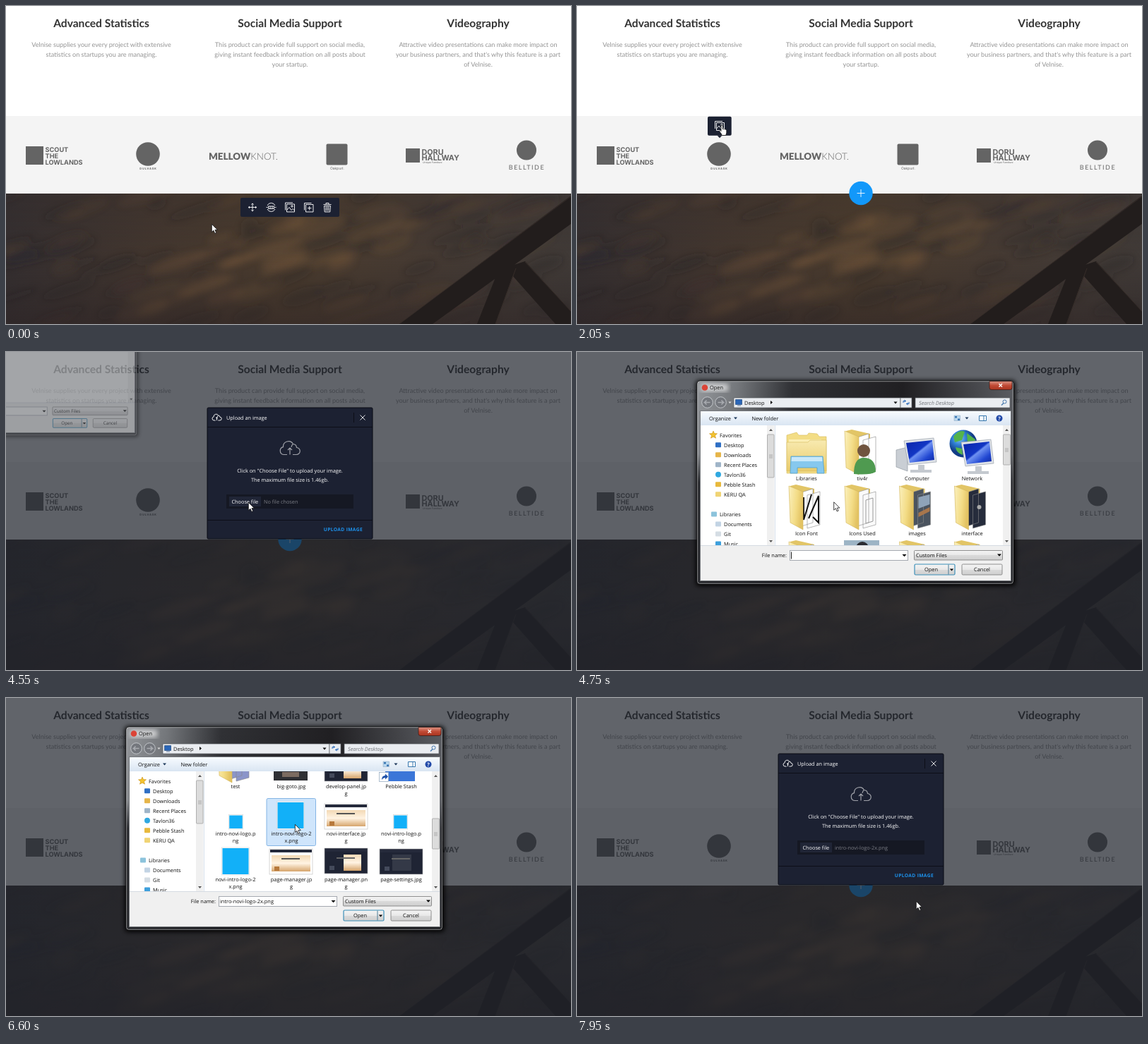
Recreate the animation shown at these times as an HTML page. Size 800x451 px, loop 8 s.

```html
<!DOCTYPE html>
<html lang="en">
<head>
<meta charset="utf-8">
<title>Image upload</title>
<style>
  html, body { margin: 0; width: 100%; height: 100%; overflow: hidden; background: #fff; }
  svg { display: block; width: 100vw; height: 100vh; text-rendering: geometricPrecision; }
  .mid { text-anchor: middle; }
  .end { text-anchor: end; }
  .head { font: 700 15.6px Lato, sans-serif; fill: #333; }
  .body { font: 9.1px Lato, sans-serif; fill: #939393; }
  .brand { fill: #646464; font-family: Inter, sans-serif; font-weight: 700; }
  .ui { font: 7.3px "Open Sans", sans-serif; fill: #fff; }
  .win { font: 7.4px "Open Sans", sans-serif; fill: #111; }
  .navy { fill: #1c2132; }
  .line { fill: none; stroke: #fff; stroke-width: .9; }
  .cloud { fill: none; stroke: #fff; }
</style>
</head>
<body>
<svg viewBox="0 0 800 451">
  <defs>
    <filter id="soft" x="-50%" y="-100%" width="200%" height="300%"><feGaussianBlur stdDeviation="5"/></filter>
    <filter id="shade" x="-10%" y="-10%" width="120%" height="120%"><feGaussianBlur stdDeviation="3"/></filter>
    <linearGradient id="sky"><stop stop-color="#352f30"/><stop offset=".25" stop-color="#42362f"/><stop offset=".5" stop-color="#4b3c2e"/><stop offset=".75" stop-color="#453a33"/><stop offset="1" stop-color="#403a37"/></linearGradient>
    <linearGradient id="dusk" x2="0" y2="1"><stop stop-color="#2a2526" stop-opacity=".15"/><stop offset=".5" stop-color="#2a2526" stop-opacity="0"/><stop offset="1" stop-color="#2a2123" stop-opacity=".5"/></linearGradient>
    <linearGradient id="glass"><stop stop-color="#95989c"/><stop offset=".13" stop-color="#74777b"/><stop offset=".3" stop-color="#303135"/><stop offset=".65" stop-color="#201f22"/><stop offset="1" stop-color="#5b5d62"/></linearGradient>
    <linearGradient id="glassFade" x2="0" y2="1"><stop stop-color="#15161a" stop-opacity="0"/><stop offset=".36" stop-color="#15161a" stop-opacity=".1"/><stop offset=".5" stop-color="#15161a" stop-opacity=".85"/></linearGradient>
    <linearGradient id="bar" x2="0" y2="1"><stop stop-color="#f7fbff"/><stop offset="1" stop-color="#d9e5f2"/></linearGradient>
    <linearGradient id="button" x2="0" y2="1"><stop stop-color="#f4f4f4"/><stop offset=".5" stop-color="#e8e8e8"/><stop offset=".51" stop-color="#dadada"/><stop offset="1" stop-color="#cfcfcf"/></linearGradient>
    <linearGradient id="red" x2="0" y2="1"><stop stop-color="#dc9484"/><stop offset=".5" stop-color="#c14a35"/><stop offset="1" stop-color="#a93520"/></linearGradient>
    <linearGradient id="screen" x2="1" y2="1"><stop stop-color="#0a24a8"/><stop offset=".45" stop-color="#1236c4"/><stop offset=".5" stop-color="#6f92f2"/><stop offset=".75" stop-color="#2248d2"/><stop offset="1" stop-color="#0b259b"/></linearGradient>
    <linearGradient id="flap" x2="1" y2=".3"><stop stop-color="#fbf0bd"/><stop offset=".6" stop-color="#f3dc86"/><stop offset="1" stop-color="#e3c363"/></linearGradient>
    <linearGradient id="front" x2="0" y2="1"><stop stop-color="#f8eab0"/><stop offset="1" stop-color="#e9cb6b"/></linearGradient>
    <radialGradient id="globe" cx=".35" cy=".3"><stop stop-color="#8cc8f5"/><stop offset=".5" stop-color="#2f7fd4"/><stop offset="1" stop-color="#123c86"/></radialGradient>
    <linearGradient id="sun" x2="0" y2="1"><stop stop-color="#f3d9b5"/><stop offset=".5" stop-color="#fff3e2"/><stop offset="1" stop-color="#d6a56c"/></linearGradient>
    <clipPath id="photoBox"><rect y="266" width="800" height="185"/></clipPath>
    <clipPath id="listBox"><rect x="281" y="104" width="321" height="170"/></clipPath>
    <clipPath id="sideBox"><rect x="175" y="104" width="105" height="170"/></clipPath>
    <g id="imageIcon" class="line"><path d="M-6.5 4V-6.5H4M-4.5-4.5H6.5V6.5H-4.5ZM-4.5 4-1 0 2 4 4 2 6.5 4.5"/><circle cx="3" cy="-1.5" r="1.2"/></g>
    <path id="cloud" class="cloud" d="M-4 9.500H-9A5.500 5.500 0 0 1-9.500-1.300A7.500 7.500 0 0 1 4.500-5.500A5.500 5.500 0 0 1 9.500-.5A5 5 0 0 1 9 9.500H4M2-1A6 6 0 0 1 4.500-5.500M0 9.500V0M-3 3 0 0 3 3"/>
  </defs>

  <g id="page">
    <rect width="800" height="451" fill="#fff"/>
    <rect y="156" width="800" height="110" fill="#f4f4f4"/>
    <g id="copy"></g>
    <g class="brand">
      <rect x="28" y="199" width="25" height="26"/>
      <g font-size="9.2"><text x="55.500" y="206.500">SCOUT</text><text x="55.500" y="215.700">THE</text><text x="55.500" y="225">LOWLANDS</text></g>
      <circle cx="201" cy="210" r="16.800"/>
      <text class="mid" x="201.500" y="232" font-size="4" letter-spacing=".8">DULVASK</text>
      <text x="287" y="217.500" font-size="13.400" font-family="Lato, sans-serif" font-weight="900">MELLOW<tspan font-weight="300">KNOT.</tspan></text>
      <rect x="453.500" y="195.500" width="30" height="30" rx="2"/>
      <text class="mid" x="469" y="232" font-size="5" font-weight="400">Oakpurl.</text>
      <rect x="566" y="202" width="20" height="20"/>
      <g font-size="10.800"><text x="588.500" y="210.500">DORU</text><text x="588.500" y="219.300">HALLWAY</text></g>
      <text x="590" y="222.800" font-size="3.500" font-weight="400">Unique Furniture</text>
      <circle cx="737" cy="204.500" r="14"/>
      <text class="mid" x="737.500" y="232" font-size="9" font-weight="400" letter-spacing="1.500" font-family="Lato, sans-serif">BELLTIDE</text>
    </g>
    <g clip-path="url(#photoBox)">
      <rect y="265" width="800" height="186" fill="url(#sky)"/>
      <g id="clouds" filter="url(#soft)"></g>
      <rect y="265" width="800" height="186" fill="url(#dusk)"/>
      <path fill="#221d1c" d="M800 269V309L604 451H557ZM697 375 722 370 693 451H667ZM707 371 735 362 800 433V451H778Z"/>
      <path fill="none" stroke="#352c28" d="M800 270 558 450M735 363 800 433M722 372 693 451"/>
    </g>
    <g id="plus"><circle cx="402" cy="265.500" r="16.700" fill="#1298fa"/><path class="line" d="M396.500 265.500h11M402 260v11"/></g>
    <g id="toolbar">
      <rect class="navy" x="332" y="272" width="140" height="27" rx="2"/>
      <g class="line">
        <path d="M343.500 285.500h11M349 280v11M345 284l-1.700 1.500 1.700 1.500M353 284l1.700 1.500-1.700 1.500M347.500 281.600l1.500-1.700 1.500 1.700M347.500 289.400l1.500 1.700 1.500-1.700"/>
        <path d="M370 283a6 6 0 0 1 11 0M370 288a6 6 0 0 0 11 0M368.500 285.500h2M380.500 285.500h2M371.500 284h8v3.500h-8ZM374 284v3M377 284v3"/>
        <path d="M422.500 289.500V279.500H432.500M424.500 281.500h10.500v10.500h-10.500ZM427 286.700h5.500M429.700 284v5.500"/>
        <path d="M449.500 281.500h11M453 281.500v-2h4v2M450.500 283.500h9l-.700 8.500h-7.600ZM453 284.500v6M455 284.500v6M457 284.500v6"/>
      </g>
      <use href="#imageIcon" x="402" y="285.500"/>
    </g>
    <g id="popover"><rect class="navy" x="185" y="156.700" width="33.700" height="27" rx="2"/><path class="navy" d="M198.500 183.500h7l-3.500 3.700Z"/><use href="#imageIcon" x="202" y="170"/></g>
    <g id="tooltip"><rect class="navy" x="168" y="127" width="68" height="23" rx="2"/><path class="navy" d="M199 150h6l-3 3Z"/><text class="ui mid" x="202" y="141">Change image</text></g>
  </g>

  <g id="modal">
    <rect width="800" height="451" fill="#1f232b" opacity=".7"/>
    <rect class="navy" x="285" y="79" width="234" height="186" rx="1.500" stroke="#090b12"/>
    <path stroke="#0c0e17" fill="none" d="M285 106.500H519M285 238.500H519M492.500 86V100"/>
    <use href="#cloud" transform="translate(298.500 92.500) scale(.47)" stroke-width="2"/>
    <text class="ui" x="312" y="95.500">Upload an image</text>
    <path class="line" d="M501.500 89.500l7 7M508.500 89.500l-7 7"/>
    <use href="#cloud" transform="translate(402 136)" stroke-width="1.200" opacity=".58"/>
    <text class="ui mid" x="402" y="170.800">Click on "Choose File" to upload your image.</text>
    <text class="ui mid" x="402" y="184">The maximum file size is 1.46gb.</text>
    <rect x="312" y="202" width="180" height="20" fill="#151823"/>
    <rect x="316" y="205" width="45" height="14" fill="#202536"/>
    <text class="ui mid" x="338.300" y="215">Choose file</text>
    <text class="ui" id="chosen" x="365" y="215" style="fill:#7b7d85"></text>
    <text class="ui end" x="505" y="254.300" style="fill:#1d93ee;font-size:6.700px;font-weight:700" letter-spacing=".35">UPLOAD IMAGE</text>
  </g>

  <g id="dialog">
    <rect id="glow" x="168" y="40" width="453" height="292" rx="5" fill="#000" filter="url(#shade)"/>
    <rect x="170" y="41" width="448" height="288" rx="4" fill="url(#glass)"/>
    <rect x="170" y="41" width="448" height="288" rx="4" fill="url(#glassFade)" stroke="#0d0e10"/>
    <rect x="170.700" y="41.700" width="446.600" height="286.600" rx="3" fill="none" stroke="#fff" stroke-opacity=".6" stroke-width=".8"/>
    <rect x="176" y="45" width="38" height="11" fill="#fff" opacity=".6" filter="url(#shade)"/>
    <circle cx="181" cy="50.500" r="4.300" fill="#db4437"/>
    <text class="win" x="188" y="53.300">Open</text>
    <path d="M584 41.500h32v9q0 3-3 3h-26q-3 0-3-3Z" fill="url(#red)" stroke="#3b1510" stroke-width=".7"/>
    <path d="M597.500 45l4.500 4.500M602 45l-4.500 4.500" stroke="#fff" stroke-width="1.400"/>
    <g fill="#74777d" stroke="#d5d8dc" stroke-width=".8"><circle cx="184.500" cy="71.500" r="7.800"/><circle cx="203.500" cy="71.500" r="7.800"/></g>
    <path d="M188.500 71.500h-8l3-3M180.500 71.500l3 3M199.500 71.500h8l-3-3M207.500 71.500l-3 3" fill="none" stroke="#a9acb1" stroke-width="1.500"/>
    <path d="M214.500 70.500h4l-2 2.500Z" fill="#ddd"/>
    <g fill="#eaedf1" stroke="#5c6065" stroke-width=".7"><rect x="222" y="65" width="236" height="14"/><rect x="458" y="65" width="16" height="14"/><rect x="479" y="65" width="134" height="14"/></g>
    <path d="M224.500 67.500h9v7h-9ZM227 76h5" fill="#2a66b8" stroke="#234a7c" stroke-width=".7"/>
    <text class="win" x="237" y="74.500">Desktop</text>
    <path d="M274 69l3 2.500-3 2.500ZM448.500 70.500h5l-2.500 3Z"/>
    <path d="M462 72v-2.500h3.500M463.500 68l2 1.500-2 1.500M470 71v2.500h-3.500M468.500 75l-2-1.500 2-1.500" fill="none" stroke="#2465b8"/>
    <text class="win" x="484" y="74.500" style="fill:#73767b;font-style:italic">Search Desktop</text>
    <path d="M601 75.500l3-3" stroke="#4778ae" stroke-width="1.500"/><circle cx="605.500" cy="70.500" r="2.500" fill="none" stroke="#4778ae"/>
    <rect x="174.500" y="83.500" width="440" height="241" fill="#f0f0f0" stroke="#777a7e"/>
    <rect x="175" y="84" width="439" height="20" fill="url(#bar)"/>
    <g style="fill:#1e395b"><text class="win" x="187" y="96.700">Organize</text><path d="M222 92.500h5l-2.500 3ZM549.500 92.500h5l-2.500 3Z"/><text class="win" x="247.500" y="96.700">New folder</text></g>
    <path d="M534 90h8.500v7.500h-8.500Z" fill="#b9d7ee" stroke="#8ba3bc" stroke-width=".5"/><path d="M535 91h3v2.500h-3ZM539 94.500h3v2.500h-3Z" fill="#3d78b4"/>
    <path d="M569.500 90.500h10v7h-10ZM576 90.500v7" fill="#fff" stroke="#3576ad"/>
    <circle cx="598" cy="94" r="4.500" fill="#2149a8"/><text class="win mid" x="598" y="96.800" style="fill:#fff;font-weight:700">?</text>
    <rect x="175" y="104" width="439" height="170" fill="#fff"/>
    <g id="sidebar" clip-path="url(#sideBox)"></g>
    <path d="M280.500 104V274" stroke="#d9e3ee"/>
    <g id="list" clip-path="url(#listBox)"><g id="files"></g></g>
    <g fill="#f0f0f0"><rect x="269" y="104" width="10.500" height="170"/><rect x="603" y="104" width="11" height="170"/></g>
    <path fill="#555" d="M272 112h5l-2.500-3ZM272 267h5l-2.500 3ZM606 112h5l-2.500-3ZM606 267h5l-2.500 3Z"/>
    <g fill="#dcdcdc" stroke="#999" stroke-width=".7"><rect x="269.500" y="117" width="9.500" height="61" rx="1"/><path d="M272 146h5M272 148h5M272 150h5"/><g id="thumb"><rect x="603.500" y="117" width="10" height="43" rx="1"/><path d="M606 137h5M606 139h5M606 141h5"/></g></g>
    <path d="M175 274.500H614" stroke="#d5dbe2"/>
    <text class="win end" x="297" y="290.500">File name:</text>
    <rect x="301.500" y="281.500" width="167" height="14" fill="#fff" stroke="#a5a9b0"/>
    <text class="win" id="fileName" x="303" y="290.800"></text>
    <path id="caret" d="M303.500 283.500v10" stroke="#000" stroke-width=".9"/>
    <g stroke="#777" fill="url(#button)" stroke-width=".8"><rect x="477.500" y="281.500" width="125" height="13.500" rx="1"/><rect x="545" y="301" width="57" height="15" rx="1.500"/><rect id="openButton" x="478" y="301" width="57" height="15" rx="1.500" style="stroke:#3c8fb8;stroke-width:1.200"/></g>
    <path d="M526 301.500v14" stroke="#4b7d97"/><path d="M460.500 287h6l-3 3.300ZM595 286.500h6l-3 3.300ZM527.700 307.500h5.500l-2.700 3Z"/>
    <text class="win" x="480" y="290.800">Custom Files</text>
    <text class="win mid" x="501.500" y="311.200">Open</text><text class="win mid" x="573.500" y="311.200">Cancel</text>
  </g>

  <g id="cursor">
    <path id="arrow" fill="#fff" stroke="#111" stroke-width=".8" d="M.3.300V11.700L2.900 9.300 4.800 13.500 6.700 12.600 4.900 8.600H8.400Z"/>
    <path id="hand" fill="#fff" stroke="#111" stroke-width=".8" d="M1 2.200Q1 .8 2.200.800T3.400 2.200V6.500Q4.500 5.700 5.400 6.800 6.600 6 7.300 7.300 8.700 6.800 8.800 8.500V11.500Q8.500 13 7.700 15.500H2.300Q1.500 13-.8 10.500-1.700 9-.6 8.500.200 8.300 1 9.500Z"/>
  </g>
</svg>
<script>
const $ = id => document.getElementById(id);
const text = (x, y, cls, str) => `<text class="${cls}" x="${x}" y="${y}">${str}</text>`;
const rect = (x, y, w, h, fill, extra = '') => `<rect x="${x}" y="${y}" width="${w}" height="${h}" fill="${fill}" ${extra}/>`;

// Page copy
$('copy').innerHTML = [
  [135, 'Advanced Statistics', 'Velnise supplies your every project with extensive', 'statistics on startups you are managing.'],
  [402, 'Social Media Support', 'This product can provide full support on social media,', 'giving instant feedback information on all posts about', 'your startup.'],
  [668.5, 'Videography', 'Attractive video presentations can make more impact on', "your business partners, and that's why this feature is a part", 'of Velnise.'],
].map(([x, title, ...lines]) => text(x, 30, 'head mid', title) +
  lines.map((line, i) => text(x, 58 + 14 * i, 'body mid', line)).join('')).join('');

// Sunset clouds: warm near the middle, dark towards the edges
let seed = 11;
const random = () => (seed = seed * 16807 % 2147483647) / 2147483647;
$('clouds').innerHTML = Array.from({ length: 110 }, () => {
  const x = random() * 800, y = 265 + random() * 186;
  const warmth = Math.exp(-(((x - 360) / 260) ** 2) - ((y - 355) / 95) ** 2);
  const warm = random() < .3 + warmth * .3;
  return `<ellipse cx="${x}" cy="${y}" rx="${12 + random() * 34}" ry="${4 + random() * 8}" transform="rotate(-18 ${x} ${y})"
    fill="${warm ? '#80603f' : '#29242a'}" opacity="${warm ? .06 + warmth * .24 : .24}"/>`;
}).join('');

// Sidebar of the file dialog
const sideItem = (x, y, label, color, round) =>
  (round ? `<circle cx="${x - 8}" cy="${y - 3}" r="4" fill="${color}"/>` : rect(x - 12, y - 6.5, 8, 7, color, 'rx="1"')) + text(x, y, 'win', label);
$('sidebar').innerHTML =
  '<path fill="#f2c22e" stroke="#c98f17" stroke-width=".6" d="M193 112l1.500 3.500 4 .3-3 2.600 1 3.800-3.500-2-3.500 2 1-3.800-3-2.600 4-.3Z"/>' +
  text(202, 120.5, 'win', 'Favorites') +
  [['Desktop', '#2f6fc4'], ['Downloads', '#e6b54a'], ['Recent Places', '#9fb4c8'], ['Tavlon36', '#2fa8e0', 1], ['Pebble Stash', '#e8b93c'], ['KERU QA', '#f0d475']]
    .map(([label, color, round], i) => sideItem(208, 134.8 + 14 * i, label, color, round)).join('') +
  sideItem(202, 233, 'Libraries', '#8cc3dc') +
  [['Documents', '#c3d4e4'], ['Git', '#d5dde4'], ['Music', '#3d9fdc']]
    .map(([label, color], i) => sideItem(208, 247 + 14 * i, label, color)).join('');

// Contents of the file list
const columns = [325, 404, 481.5, 559.5];
const folder = (x, y, inside = '#fff', extra = '') => `<g transform="translate(${x - 25} ${y})">
  <path fill="#e2c566" d="M2 2 10 0 36 6V58L2 49Z"/>
  <path fill="${inside}" stroke="#888" stroke-width=".6" d="M18 11 34 6V54L18 59ZM26 15 44 10V57L26 62Z"/>${extra}
  <path fill="url(#flap)" stroke="#d2b458" stroke-width=".6" d="M0 2 20 10V64L2 54Z"/></g>`;
const monitor = (x, y) => `<path fill="#dfe3e8" stroke="#9ba3ab" stroke-width=".7" d="M${x} ${y + 2}l42-4 4 34-40 4Z"/>
  <path fill="url(#screen)" d="M${x + 3} ${y + 5}l37-4 3 28-35 4Z"/><path fill="#c4c9cf" d="M${x + 20} ${y + 36}h9v7h10v4h-30v-4h11Z"/>`;
const labels = (names, y) => names.map((name, i) => name.split('|')
  .map((line, row) => text(columns[i], y + 10 * row, 'win mid', line)).join('')).join('');
const page = (x, y, dark, warm = true) => rect(x, y, 61, 36, dark ? '#1f2434' : '#fff', 'stroke="#bbb" stroke-width=".6"') +
  rect(x + 1, y + 1, 59, 4, '#252a3b') + (warm ? rect(x + (dark ? 27 : 3), y + 9, dark ? 25 : 55, 23, 'url(#sun)') : rect(x + 18, y + 8, 27, 23, '#343947')) +
  rect(x + 17, y + 13, 26, 2, dark ? '#666' : '#555') + rect(x + 7, y + 25, 7, 6, dark ? '#444a5b' : '#b7793c');
const tile = (cx, bottom, size) => rect(cx - size / 2 - 1, bottom - size - 1, size + 2, size + 2, '#fff', 'stroke="#ccc" stroke-width=".5"') +
  rect(cx - size / 2, bottom - size, size, size, '#12b0f8');
const scrollRange = 279;

$('files').innerHTML =
  '<rect id="hover" x="369" y="187.500" width="69.500" height="77" rx="2" fill="#f2f8fe" stroke="#c3ddf5"/>' +
  // first rows
  `<path fill="#f3dd85" stroke="#d6ba5c" stroke-width=".6" d="M297 118l14-4 3 4h12l2-3 12 1 3 4h10v52h-56Z"/>
   <path fill="#fbeeb4" d="M300 124h46v20h-46Z"/><path fill="url(#front)" stroke="#d6ba5c" stroke-width=".6" d="M297 128h30l3-3h23v44h-56Z"/>
   <path fill="#86c8ee" stroke="#4a9fd0" stroke-width=".8" d="M303 148h45l2 24h-10v-8h-28v8h-10Z"/><path fill="#c9e8fa" d="M304 149h43l.5 6h-44Z"/>` +
  folder(404, 110) +
  `<circle cx="406" cy="140" r="9" fill="#70543f"/><path fill="#4f9a50" d="M392 173q0-23 14-23 17 0 17 20-8 5-31 3Z"/>` +
  `<path fill="#c9ced4" stroke="#949ca4" stroke-width=".7" d="M452 139l16-4v34l-16-6Z"/>` + monitor(463, 124) +
  `<circle cx="547" cy="130" r="19.500" fill="url(#globe)"/><path fill="#55b34b" d="M533 120q8-11 16-7l-4 12-10 3ZM552 115l12 9-3 11-8-6ZM536 135l9 2 1 9q-9-3-10-11Z"/>` + monitor(544, 126) +
  folder(325, 188, '#fff', '<path fill="none" stroke="#111" stroke-width="2" d="M21 18V50L32 14M28 48 42 16V54L34 46"/>') +
  folder(404, 188, '#fafafa', '<path fill="none" stroke="#999" d="M30 22 40 19V52L30 55Z"/>') +
  folder(481.5, 188, '#4b545f', '<path fill="#8fa3b8" d="M27 18 43 14V28L27 34Z"/><path fill="#a8764c" d="M27 40 43 32V38L27 46Z"/>') +
  folder(559.5, 188, '#262c3c', '<circle cx="35" cy="32" r="3" fill="#aaa"/>') +
  folder(325, 267) + rect(378, 267, 50, 55, '#9db4c5') + '<circle cx="404" cy="278" r="9" fill="#2b2c32"/>' + folder(481.5, 267) + folder(559.5, 267) +
  labels(['Libraries', 'tiv4r', 'Computer', 'Network'], 182.3) +
  labels(['Icon Font', 'Icons Used', 'images', 'interface'], 260.3) +
  // last rows, laid out as seen when scrolled to the end
  `<g transform="translate(0 ${scrollRange})">
   <rect id="selection" x="369" y="142.500" width="69.500" height="67" rx="2" fill="#cfe5fb" stroke="#84b4e4"/>` +
  folder(325, 56, '#8b95c9') + rect(379, 82, 48, 35, '#2f3034') + rect(391, 105, 24, 7, '#7b6b60') + page(451, 82, true) +
  rect(537, 76, 42, 42, '#3b76d8') + rect(528.5, 105.5, 13, 13, '#fff', 'stroke="#8da4bd" stroke-width=".7"') +
  `<path d="M532 116q0-6 5-6v-2.500l4 4-4 4v-2.500q-3 0-5 3Z" fill="#1d50a8"/>` +
  tile(325.5, 185, 18.5) + tile(403, 185, 37) + page(451, 150, false) + tile(558.5, 185, 18.5) +
  tile(325, 250, 37) + page(373, 214, false) + page(451, 213, true) + page(529, 214, true, false) +
  labels(['test', 'big-goto.jpg', 'develop-panel.jp|g', 'Pebble Stash'], 127.7) +
  labels(['intro-novi-logo.p|ng', 'intro-novi-logo-2|x.png', 'novi-interface.jp|g', 'novi-intro-logo.p|ng'], 195) +
  labels(['novi-intro-logo-2|x.png', 'page-manager.jp|g', 'page-manager.pn|g', 'page-settings.jpg'], 259.5) + '</g>';

// Timeline
const duration = 8000, file = 'intro-novi-logo-2x.png';
const cursorPath = [
  [0, 291, 309], [333, 291, 309], [1200, 203, 214], [2050, 203, 168], [3333, 203, 168], [4200, 343, 213], [4583, 343, 213],
  [5250, 424, 211], [6200, 424, 211], [6550, 409, 179], [6650, 409, 179], [7050, 494, 303], [7100, 494, 303], [7600, 480, 288], [duration, 480, 288],
];
const wheelTurns = [5500, 5567, 5633, 5700, 5783, 5950, 6050];
const ramp = (t, from, to) => Math.min(1, Math.max(0, (t - from) / (to - from)));
const fade = (id, opacity) => {
  $(id).style.opacity = opacity;
  $(id).style.display = opacity > 0 ? '' : 'none';
};

function cursorAt(t) {
  const i = cursorPath.findIndex(key => key[0] > t);
  const [t0, x0, y0] = cursorPath[i - 1], [t1, x1, y1] = cursorPath[i];
  const p = ramp(t, t0, t1);
  return [x0 + (x1 - x0) * p, y0 + (y1 - y0) * p];
}

function placeDialog(t) {
  const opening = ramp(t, 4450, 4690), closing = ramp(t, 7700, 7950);
  const scale = opening < 1 ? .74 + .26 * opening : 1 - .06 * closing;
  const [x, y] = opening < 1 ? [-5, -4] : [394, 185];
  $('dialog').setAttribute('transform', `translate(${x} ${y}) scale(${scale}) translate(-394 -185)`);
  fade('dialog', opening * (1 - closing));
  fade('list', opening < 1 ? 0 : 1);
}

function draw(t) {
  const leaving = ramp(t, 733, 870), modal = ramp(t, 3100, 3200);
  fade('toolbar', 1 - leaving);
  fade('plus', leaving);
  fade('popover', ramp(t, 1230, 1420) * (1 - modal));
  fade('tooltip', ramp(t, 2370, 2650) * (1 - modal));
  fade('modal', modal);
  placeDialog(t);

  const turned = wheelTurns.filter(time => time <= t).length / wheelTurns.length;
  $('files').setAttribute('transform', `translate(0 ${-scrollRange * turned})`);
  $('thumb').setAttribute('transform', `translate(0 ${54 * turned})`);
  const picked = t >= 6560;
  fade('hover', t > 5200 && !turned ? 1 : 0);
  fade('selection', picked ? 1 : 0);
  fade('caret', !picked && (t - 5200) % 1060 < 530 ? 1 : 0);
  fade('glow', t < 7550 ? .9 : .5);
  $('openButton').style.fill = t > 7000 ? '#c4e5f6' : '';
  $('fileName').textContent = picked ? file : '';
  $('chosen').textContent = t >= 7700 ? file : 'No file chosen';

  const [x, y] = cursorAt(t), pointing = t >= 1700 && t < 3150;
  $('cursor').setAttribute('transform', `translate(${x} ${y})`);
  fade('arrow', pointing ? 0 : 1);
  fade('hand', pointing ? 1 : 0);
}

const start = performance.now();
(function tick() {
  draw((performance.now() - start) % duration);
  requestAnimationFrame(tick);
})();
</script>
</body>
</html>
```
